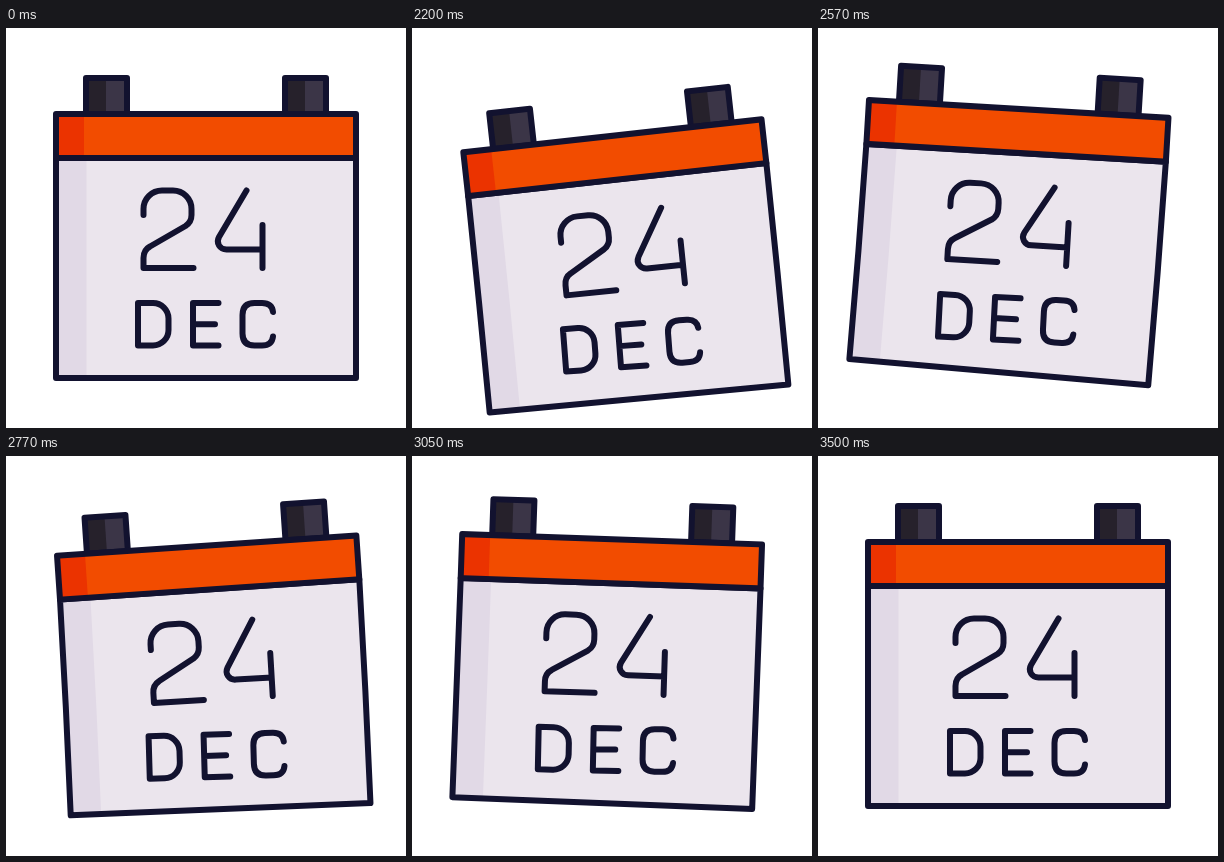
These frames come from a looping animation (400x400 px, 3520 ms). An HTML page:

```html
<!DOCTYPE html>
<html lang="en">
<head>
<meta charset="utf-8">
<title>Calendar</title>
<style>
  html, body { margin: 0; width: 100%; height: 100%; overflow: hidden; background: #fff; }
  svg { display: block; width: 100vw; height: 100vh; }
  .line { fill: none; stroke: #12122f; stroke-width: 6; stroke-linecap: round; stroke-linejoin: round; }
</style>
</head>
<body>
<svg viewBox="0 0 400 400" role="img" aria-label="24 DEC">
  <defs>
    <g id="tab">
      <path fill="#3b3547" d="M80 50H121V86H80Z"/>
      <path fill="#26212b" d="M80 50H100V86H80Z"/>
      <path class="line" d="M80 50H121V86H80Z"/>
    </g>
  </defs>
  <g id="calendar">
    <use href="#tab"/>
    <use href="#tab" x="199"/>
    <path id="page" fill="#ebe5ed"/>
    <path id="shade" fill="#e1d9e6"/>
    <path id="edge" class="line"/>
    <path fill="#f24c00" d="M50 86H350V130H50Z"/>
    <path fill="#eb3300" d="M50 86H78V130H50Z"/>
    <path class="line" d="M50 86H350V130H50Z"/>
    <g id="day" class="line">
      <path d="M137.5 187V181A18.5 18.5 0 0 1 156 162.5H167A18.5 18.5 0 0 1 185.5 181V187Q185.5 194 179.5 198L144 218.5Q137.5 222 137.5 230V240H187.5"/>
      <path d="M240.5 162.5L213 209Q210.5 213.5 213 217.5T220.5 221.5H256.5M256.5 197V240"/>
    </g>
    <g id="month" class="line">
      <path d="M132 275H147A15.5 15.5 0 0 1 162.5 290.5V302A15.5 15.5 0 0 1 147 317.5H132Z"/>
      <path d="M212.5 275H187V317.5H212.5M187 296.2H209"/>
      <path d="M267 284Q266 275 256 275H248.5Q236.5 275 236.5 287V305.5Q236.5 317.5 248.5 317.5H256Q266 317.5 267 308.5"/>
    </g>
  </g>
</svg>
<script>
const LOOP = 3520, START = 2020, LAG = 30;

const $ = id => document.getElementById(id);
const set = (id, name, value) => $(id).setAttribute(name, value);

// Swings from one [time, value] turning point to the next with sine easing
const swing = (...peaks) => t => {
  const i = peaks.findIndex(p => p[0] > t);
  if (i < 1) return 0;
  const [t0, a] = peaks[i - 1], [t1, b] = peaks[i];
  return a + (b - a) * (1 - Math.cos(Math.PI * (t - t0) / (t1 - t0))) / 2;
};

const lift = swing([1980, 0], [2190, 22], [2450, -11], [2730, 4], [2990, -3], [3300, 0]);
const tilt = swing([1980, 0], [2235, -6.6], [2555, 3.5], [2790, -4], [3060, 2], [3480, 0]);
const bend = swing([1980, 0], [2110, 4], [2390, -8.8], [2660, 5], [2920, -4], [3140, 2.6], [3480, 0]);

// Page area whose sides curve towards a shifted and turned lower edge
function sheet(left, right, turn) {
  const sway = -2.6 * turn, r = turn * Math.PI / 180;
  const foot = x => [
    200 + sway + (x - 200) * Math.cos(r),
    350 - sway * sway / 440 + (x - 200) * Math.sin(r)
  ];
  const knee = (x, [fx, fy]) => `${x + (fx - x) * 0.25} ${(130 + fy) / 2}`;
  const a = foot(left), b = foot(right);
  return `M${left} 130Q${knee(left, a)} ${a}L${b}Q${knee(right, b)} ${right} 130Z`;
}

// Lettering follows the page by a given share
const follow = (id, y, turn, share, shift) =>
  set(id, 'transform', `translate(${turn * shift} 0) rotate(${turn * share} 200 ${y})`);

function draw(now) {
  const t = now < START ? 0 : now;
  const turn = bend(t), late = bend(t - LAG);
  const page = sheet(50, 350, turn);
  set('calendar', 'transform',
    `translate(${0.45 * turn} ${lift(t)}) rotate(${tilt(t)} 200 86)`);
  set('page', 'd', page);
  set('edge', 'd', page);
  set('shade', 'd', sheet(50, 80.5, turn));
  follow('day', 201, late, 0.18, -0.13);
  follow('month', 296, late, 0.75, -1.25);
}

const begin = performance.now();
function tick() {
  draw((performance.now() - begin) % LOOP);
  requestAnimationFrame(tick);
}
tick();
</script>
</body>
</html>
```
